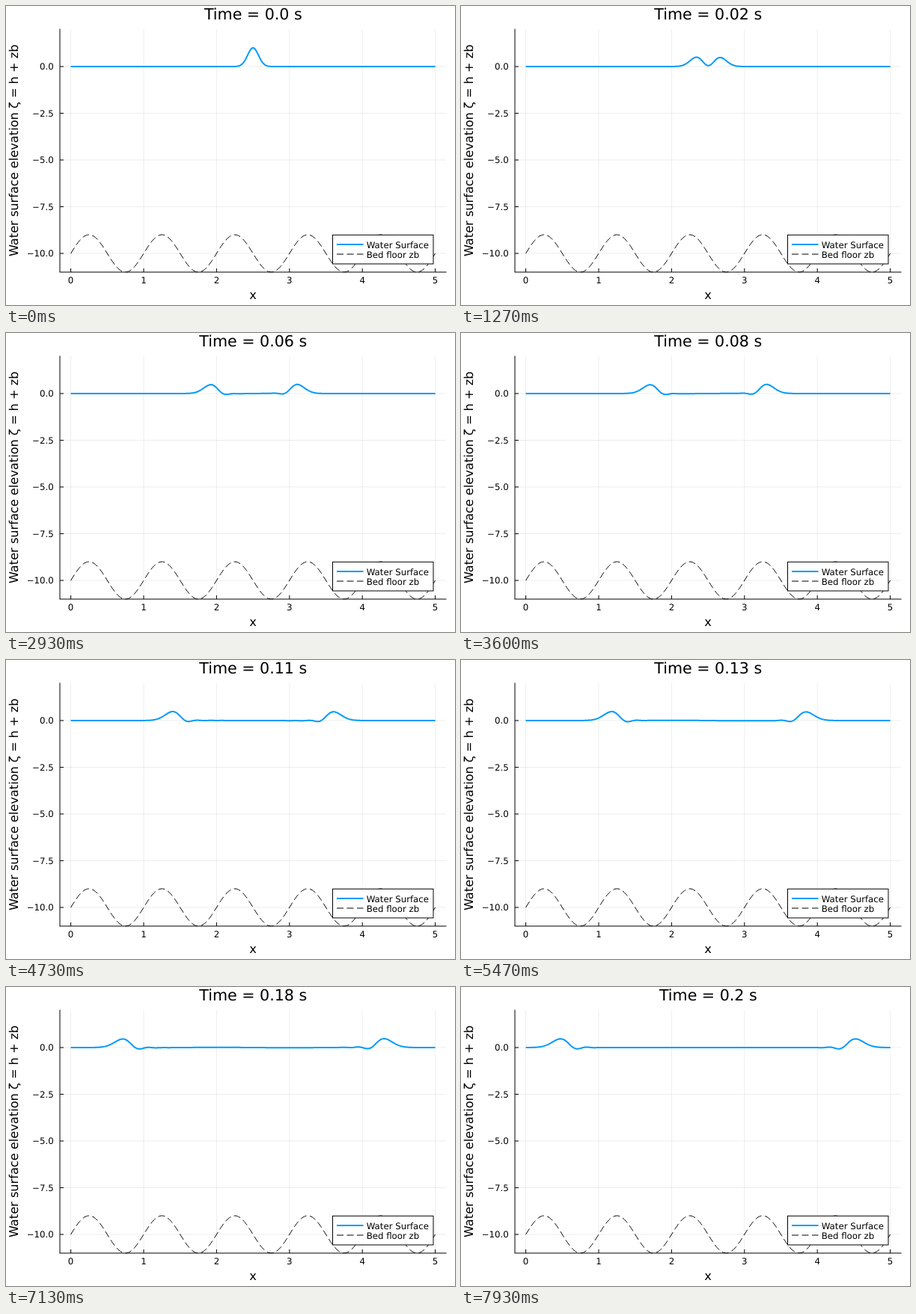
An HTML page for the animation above (8000 ms loop, 600 by 400 pixels).

```html
<!DOCTYPE html>
<html lang="en">
<head>
<meta charset="utf-8">
<title>Water surface over a wavy bed</title>
<style>
  html, body { margin: 0; width: 100%; height: 100%; overflow: hidden; background: #fff; }
  svg { display: block; width: 600px; height: 400px; }
  text { font-family: "DejaVu Sans", sans-serif; font-size: 11.78px; text-rendering: geometricPrecision; }
  .label { font-size: 16.2px; text-anchor: middle; }
  .title { font-size: 20.6px; text-anchor: middle; }
  .grid { stroke: #000; stroke-opacity: .07; }
  .axis { stroke: #000; fill: none; }
  .bed { stroke: #000; fill: none; stroke-dasharray: 9 4.5; }
  .water { stroke: #009afa; stroke-width: 2; fill: none; stroke-linejoin: round; }
</style>
</head>
<body>
<svg viewBox="0 0 600 400">
  <defs><clipPath id="plot"><rect x="72" y="30.5" width="516.5" height="326"/></clipPath></defs>
  <g id="axes"></g>
  <path class="axis" d="M72 30.5V356M71.5 356H588.5"/>
  <g clip-path="url(#plot)">
    <path id="bed" class="bed"/>
    <path id="water" class="water"/>
  </g>
  <rect x="436.5" y="306.3" width="134.5" height="38.7" fill="#fff" stroke="#000"/>
  <path class="water" d="M442 319H477.5"/>
  <path class="bed" d="M442 332H477.5"/>
  <text x="481.7" y="323.5">Water Surface</text>
  <text x="481.7" y="336.5">Bed floor zb</text>
  <text id="title" class="title" x="330.3" y="18"></text>
  <text class="label" x="330" y="391.5">x</text>
  <text class="label" transform="translate(16.3 193.3) rotate(-90)">Water surface elevation ζ = h + zb</text>
</svg>
<script>
const LOOP = 8000, FPS = 15, HOLD = 9, STEPS = 110, END_TIME = 0.2;
const UNIT = 97.4, CENTER = 2.5, MODES = 60;
const byId = id => document.getElementById(id);
const px = x => 86.6 + UNIT * x;
const py = y => 81 - 25 * y;

function curve(f, step) {
  const points = [];
  for (let i = 0; i <= 5 / step; i++) {
    const x = i * step;
    points.push(px(x).toFixed(2) + " " + py(f(x)).toFixed(2));
  }
  return "M" + points.join("L");
}

function drawAxes() {
  let svg = "";
  for (let x = 0; x <= 5; x++) {
    const X = px(x);
    svg += `<path class="grid" d="M${X} 31V356"/><path class="axis" d="M${X} 356V351"/>
      <text x="${X}" y="371.3" text-anchor="middle">${x}</text>`;
  }
  for (let y = 0; y >= -10; y -= 2.5) {
    const Y = py(y);
    svg += `<path class="grid" d="M72 ${Y}H588"/><path class="axis" d="M72 ${Y}H77"/>
      <text x="63.7" y="${Y + 4.3}" text-anchor="end">${y.toFixed(1).replace("-", "−")}</text>`;
  }
  byId("axes").innerHTML = svg;
}

// Gaussian pulse spread by cubic dispersion; positive d lies ahead of it.
function makePulse(p) {
  const spread = 0.0028 + 0.0013 * p ** 0.4;
  const tau = 1.67e-4 * p ** 0.586;
  const weights = Array.from({ length: MODES }, (_, k) => (k ? 1 : 0.5) * Math.exp(-spread * k * k));
  const total = weights.reduce((a, b) => a + b);
  return d => {
    let sum = 0;
    for (let k = 0; k < MODES; k++) sum += weights[k] * Math.cos(k * d + tau * k ** 3);
    return 0.5 * sum / total;
  };
}

function surface(n) {
  const p = n / STEPS;
  const pulse = makePulse(p);
  const travel = (1.87 * n - 6.8 * (1 - Math.exp(-n / 17))) / UNIT;
  const front = travel + 4.4 * p ** 0.36 / UNIT;
  // The bed slows one pulse where it speeds up the other.
  const phase = 2 * Math.PI * travel;
  const drift = 0.008 * (1 - Math.cos(phase));
  const gain = 0.02 * Math.sin(phase);
  const echo = -0.016 * Math.sin(Math.PI * travel);
  return x => {
    const d = CENTER - x;
    const inside = 0.5 * (1 + Math.tanh((travel - 0.12 - Math.abs(d)) / 0.08));
    return (1 + gain) * pulse(d - front + drift)
         + (1 - gain) * pulse(-d - front - drift)
         + echo * Math.sin(Math.PI * d) * inside;
  };
}

let shown = -1;
function render(now) {
  const tick = Math.floor((now % LOOP) * FPS / 1000 + 1e-6);
  const n = Math.min(STEPS, Math.max(0, tick - HOLD));
  if (n !== shown) {
    shown = n;
    const time = Math.round(n / STEPS * END_TIME * 100) / 100;
    byId("title").textContent = `Time = ${time || "0.0"} s`;
    byId("water").setAttribute("d", curve(surface(n), 0.0125));
  }
  requestAnimationFrame(render);
}

drawAxes();
byId("bed").setAttribute("d", curve(x => -10 + Math.sin(2 * Math.PI * x), 0.0125));
render(performance.now());
</script>
</body>
</html>
```
